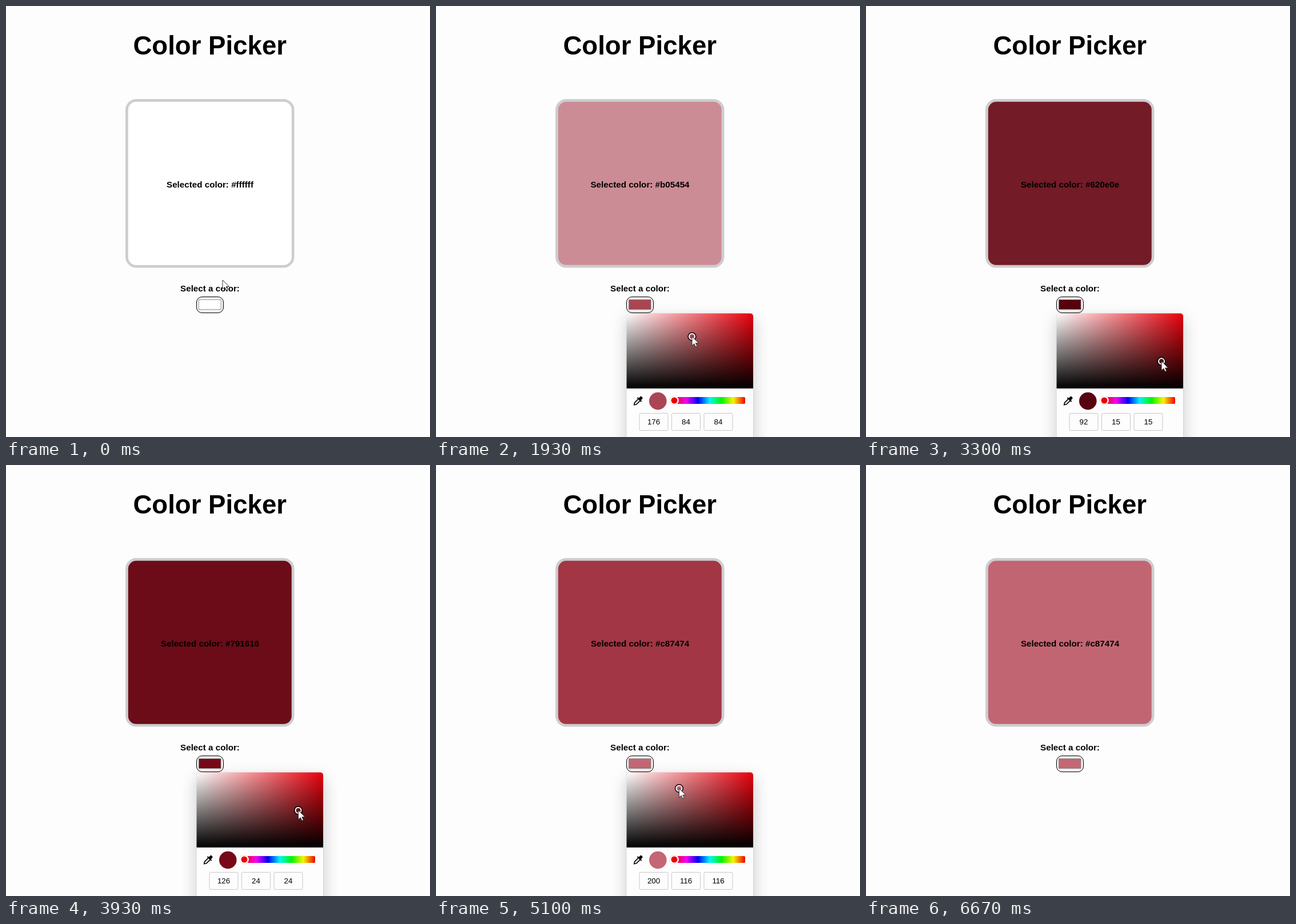
Write an HTML page that moves like this. It is 742x755 px and loops after 6700 ms.

```html
<!DOCTYPE html>
<html lang="en">
<head>
<meta charset="utf-8">
<title>Color Picker</title>
<style>
  html, body { margin: 0; width: 100%; height: 100%; overflow: hidden; background: #fdfdfd; }
  svg { display: block; width: 742px; height: 755px; }
  text { font-family: "Liberation Sans", Arial, sans-serif; text-anchor: middle; }
  .bold { font-weight: 700; font-size: 15.2px; }
  .field { font-size: 13.33px; }
</style>
</head>
<body>
<svg viewBox="0 0 742 755">
  <defs>
    <linearGradient id="tint"><stop stop-color="#fff"/><stop offset="1" stop-color="#e8000c"/></linearGradient>
    <linearGradient id="shade" x2="0" y2="1"><stop stop-color="#000" stop-opacity="0"/><stop offset="1"/></linearGradient>
    <linearGradient id="hue"></linearGradient>
    <filter id="blur" x="-30%" y="-30%" width="160%" height="160%"><feGaussianBlur stdDeviation="14"/></filter>
    <clipPath id="panelClip"><rect x="333.5" y="538.5" width="221.5" height="260" rx="5"/></clipPath>
  </defs>

  <rect width="742" height="755" fill="#fdfdfd"/>
  <text x="356.7" y="85" font-size="45.6" font-weight="700">Color Picker</text>

  <rect x="211.5" y="165.5" width="290.5" height="290.5" rx="16.5" fill="none" stroke="#cdcdcf" stroke-width="5"/>
  <rect id="box" x="213.8" y="167.8" width="286" height="286" rx="14"/>
  <text id="label" class="bold" x="357" y="318"></text>

  <text class="bold" x="357" y="500">Select a color:</text>
  <rect x="333.5" y="509.5" width="47" height="28" rx="9.5" fill="#f0f0f0" stroke="#000"/>
  <rect id="swatch" x="337.5" y="514.5" width="38.5" height="17" stroke="#777" stroke-opacity=".7"/>

  <g id="popup">
    <rect x="333" y="548" width="223" height="250" rx="5" opacity=".2" filter="url(#blur)"/>
    <rect x="333" y="538" width="222.5" height="262" rx="5.5" fill="#c8c8cc"/>
    <g clip-path="url(#panelClip)">
      <rect x="333" y="538" width="223" height="262" fill="#fdfdfd"/>
      <rect x="333" y="538" width="223" height="132" fill="url(#tint)"/>
      <rect x="333" y="538" width="223" height="132" fill="url(#shade)"/>
      <g id="ring">
        <circle r="6.7" fill="none" stroke="#000" stroke-width="1.8"/>
        <circle id="ringDot" r="5" stroke="#fff" stroke-width="2"/>
      </g>
    </g>
    <g transform="translate(353.5 692) rotate(45)">
      <path d="M-2.2 -3V6L0 9.5L2.2 6V-3" fill="none" stroke="#000" stroke-width="1.7"/>
      <path d="M-5 -4.6H5V-2.6H-5ZM-2.6 -4V-8.2Q-2.6 -10 0 -10T2.6 -8.2V-4Z"/>
    </g>
    <circle id="preview" cx="388.3" cy="692" r="15.3"/>
    <rect x="417" y="685" width="124" height="12" rx="2" fill="url(#hue)"/>
    <circle cx="417" cy="691" r="8" fill="#ccc"/>
    <circle cx="417" cy="691" r="6.5" fill="#ec0000" stroke="#fff" stroke-width="2"/>
    <g id="fields"></g>
  </g>

  <path id="cursor" d="M0 0V16L3.8 12.6L6.4 18L8.9 17L6.4 11.6H11.6Z" fill="#fff" stroke="#222" stroke-width=".9"/>
</svg>

<script>
const LOOP = 6700, OPEN = 450, PICK = 1000, RELEASE = 5600, CLOSE = 6450;
const LABEL_LAG = 80, FADE = 600;
const PAD = { x: 333, y: 538, w: 220, h: 132 };
const $ = id => document.getElementById(id);

// pointer stops: arrival time, x, y and an optional wait
const stops = [
  [0, 379, 480, 90], [350, 358, 523, 200], [PICK, 345, 542], [1800, 448, 579, 160],
  [2330, 455.3, 615], [2730, 449.3, 607.4], [3000, 534, 610.8], [3300, 517.1, 622.4],
  [4500, 506.5, 589.25, 120], [4850, 425.4, 566.5, 800], [6200, -20, 430]
];

function pointer(time) {
  const next = stops.findIndex(stop => stop[0] > time);
  if (next < 0) return stops[stops.length - 1].slice(1, 3);
  const [t0, x0, y0, wait = 0] = stops[next - 1], [t1, x1, y1] = stops[next];
  const k = Math.max(0, (time - t0 - wait) / (t1 - t0 - wait));
  return [x0 + (x1 - x0) * k, y0 + (y1 - y0) * k];
}

const ringAt = time => time < PICK ? [PAD.x, PAD.y] : pointer(Math.min(time, RELEASE));

// pure red hue: saturation runs across the pad, brightness upwards
function picked(time) {
  const [x, y] = ringAt(time);
  const red = 255 * (1 - (y - PAD.y) / PAD.h);
  const rest = red * (1 - (x - PAD.x) / PAD.w);
  return [red, rest, rest];
}

// the box follows the picked color with an exponential lag
function faded(time) {
  const sum = [0, 0, 0], step = 20;
  let total = 0;
  for (let age = 0; age < 4 * FADE; age += step) {
    const weight = Math.exp(-age / FADE);
    picked(time - age).forEach((v, i) => { sum[i] += v * weight; });
    total += weight;
  }
  return sum.map(v => v / total);
}

// saturated reds are shown a little cooler
function css([r, g, b]) {
  const chroma = r - g;
  return `rgb(${[r - .06 * chroma, g - .15 * chroma, b].map(Math.round)})`;
}
const hex = rgb => "#" + rgb.map(v => Math.round(v).toString(16).padStart(2, "0")).join("");
const place = (node, [x, y]) => node.setAttribute("transform", `translate(${x} ${y})`);

for (let i = 0; i <= 6; i++) {
  $("hue").innerHTML += `<stop offset="${i / 6}" stop-color="hsl(${360 - 60 * i} 100% 48%)"/>`;
}
$("fields").innerHTML = [381, 437.5, 494].map(x =>
  `<rect x="${x - 25}" y="713.5" width="50" height="30" rx="2" fill="#fdfdfd" stroke="#c8c8cc"/>
   <text class="field" x="${x}" y="733"></text>`).join("");
const fieldTexts = [...$("fields").querySelectorAll("text")];

function draw(time) {
  const rgb = picked(time);
  for (const id of ["swatch", "preview", "ringDot"]) $(id).setAttribute("fill", css(rgb));
  $("box").setAttribute("fill", css(faded(time)));
  $("label").textContent = "Selected color: " + hex(picked(time - LABEL_LAG));
  fieldTexts.forEach((node, i) => { node.textContent = Math.round(rgb[i]); });
  place($("ring"), ringAt(time));
  place($("cursor"), pointer(time));
  $("popup").style.display = time >= OPEN && time < CLOSE ? "" : "none";
}

const start = performance.now();
function tick() {
  draw((performance.now() - start) % LOOP);
  requestAnimationFrame(tick);
}
draw(0);
requestAnimationFrame(tick);
</script>
</body>
</html>
```
